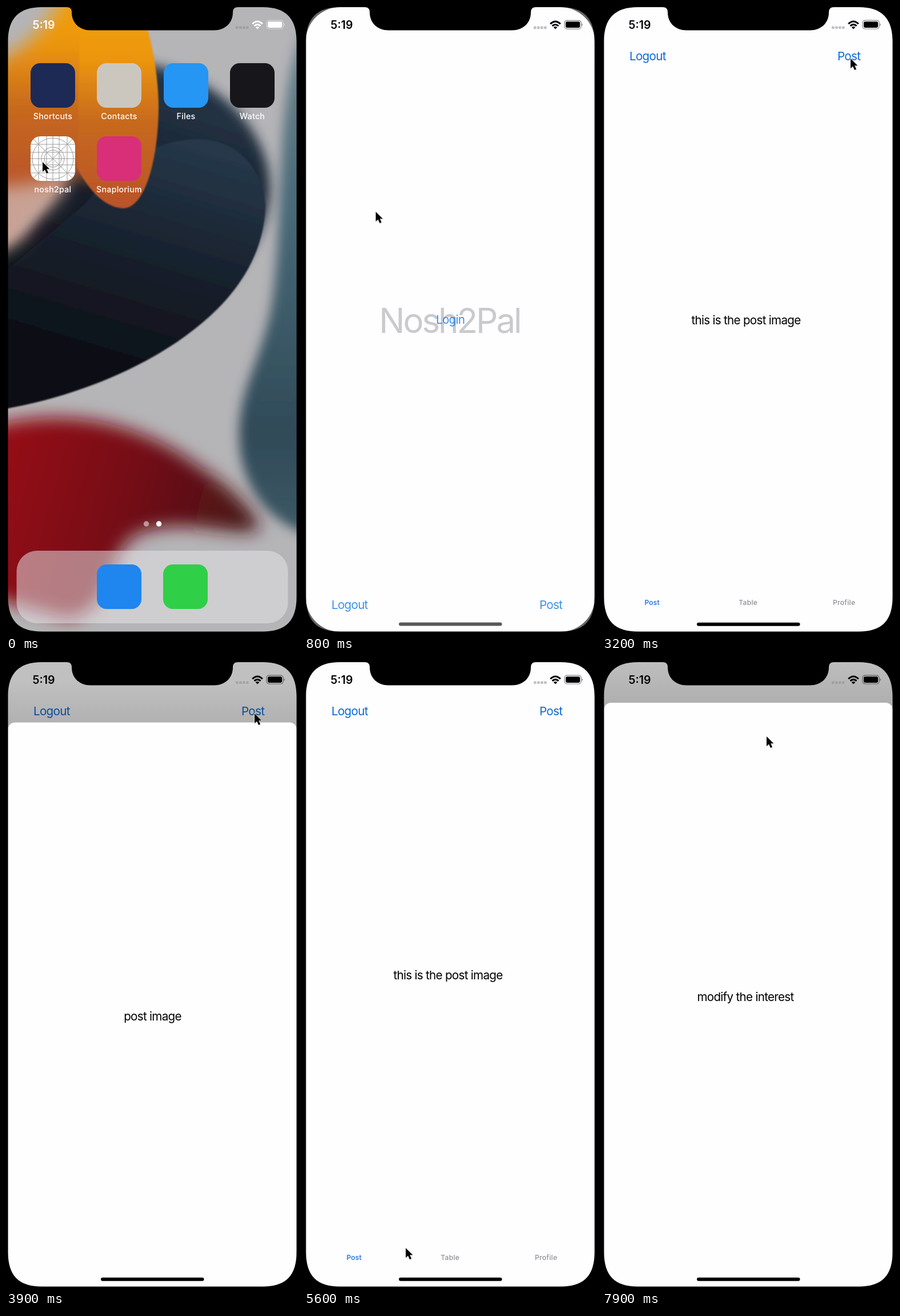
An HTML page for the animation above (8 s loop, 511 by 1097 pixels).

```html
<!DOCTYPE html>
<html lang="en">
<head>
<meta charset="utf-8">
<title>Phone app walkthrough</title>
<style>
  html, body { margin: 0; width: 100%; height: 100%; overflow: hidden; background: #000; }
  svg { display: block; width: 100%; height: 100%; }
  text { font-family: Inter, "Open Sans", sans-serif; }
  .body { font-size: 20.6px; letter-spacing: -.7px; }
  .link { fill: #0a6ad6; }
  .bright { fill: #0878e6; }
  .mid { text-anchor: middle; }
  .label { font-size: 14.2px; font-weight: 500; fill: #fff; letter-spacing: .3px; text-anchor: middle; }
  .tab { font-size: 12px; font-weight: 500; letter-spacing: .3px; text-anchor: middle; }
  .clock { font-size: 19.5px; font-weight: 600; }
</style>
</head>
<body>
<svg viewBox="0 0 511 1097" preserveAspectRatio="none">
  <defs>
    <linearGradient id="orange" x1="0" y1="0" x2="0" y2="1">
      <stop offset="0" stop-color="#f2a20a"/><stop offset=".3" stop-color="#ec960f"/>
      <stop offset=".6" stop-color="#c7691e"/><stop offset="1" stop-color="#b9532a"/>
    </linearGradient>
    <linearGradient id="navy" x1=".7" y1="0" x2=".4" y2="1">
      <stop offset="0" stop-color="#26384a"/><stop offset=".45" stop-color="#17202c"/>
      <stop offset=".8" stop-color="#0f1119"/>
    </linearGradient>
    <linearGradient id="teal" x1="0" y1="0" x2="0" y2="1">
      <stop offset="0" stop-color="#6b838d"/><stop offset=".35" stop-color="#496a78"/>
      <stop offset=".8" stop-color="#304a58"/><stop offset="1" stop-color="#3d5865"/>
    </linearGradient>
    <linearGradient id="red" x1="0" y1=".3" x2="1" y2=".5">
      <stop offset="0" stop-color="#980a14"/><stop offset=".5" stop-color="#760c13"/>
      <stop offset="1" stop-color="#45161a"/>
    </linearGradient>
    <linearGradient id="shade" x1="0" y1="0" x2="0" y2="1">
      <stop offset="0" stop-opacity="0"/><stop offset="1" stop-opacity=".09"/>
    </linearGradient>
    <filter id="soft2" x="-20%" y="-20%" width="140%" height="140%"><feGaussianBlur stdDeviation="1.3"/></filter>
    <filter id="soft10" x="-30%" y="-30%" width="160%" height="160%"><feGaussianBlur stdDeviation="10"/></filter>
    <filter id="soft16" x="-30%" y="-30%" width="160%" height="160%"><feGaussianBlur stdDeviation="15"/></filter>
    <clipPath id="cardClip"><rect id="cardRect"/></clipPath>

    <g id="status">
      <text class="clock" x="46.5" y="40">5:19</text>
      <g fill="#8e8e93" opacity=".55">
        <rect x="402" y="35.5" width="4.6" height="4.6" rx="1"/><rect x="408" y="35.5" width="4.6" height="4.6" rx="1"/>
        <rect x="414" y="35.5" width="4.6" height="4.6" rx="1"/><rect x="420" y="35.5" width="4.6" height="4.6" rx="1"/>
      </g>
      <g fill="none" stroke="currentColor" stroke-width="3">
        <path d="M431.200 31.300Q440 22.700 448.800 31.300M434.500 34.900Q440 29.900 445.500 34.900"/>
      </g>
      <path d="M440 40.500L436.700 37.200Q440 34.600 443.300 37.200Z"/>
      <rect x="456" y="25.200" width="29" height="14.800" rx="4.200" fill="none" stroke="currentColor" stroke-opacity=".5" stroke-width="1.200"/>
      <rect x="458" y="27.200" width="25" height="10.800" rx="2.400"/>
      <path d="M486.500 30.200Q489 32.500 486.500 35Z" opacity=".6"/>
    </g>

    <g id="gridIcon">
      <rect width="78" height="78" rx="17" fill="#fff"/>
      <g fill="none" stroke="#9a9a9a" stroke-width="1">
        <path d="M5 5L73 73M73 5L5 73M39 0V78M0 39H78M14 0V78M64 0V78M0 14H78M0 64H78M28 0V78M50 0V78M0 28H78M0 50H78"/>
        <circle cx="39" cy="39" r="36"/><circle cx="39" cy="39" r="20"/><circle cx="39" cy="39" r="15"/>
      </g>
    </g>
  </defs>

  <g id="home">
    <g id="wallpaper">
      <rect x="-40" y="-40" width="591" height="1177" fill="#b5b4b7"/>
      <path d="M530 30C470 120 487 350 468 500C455 610 408 660 408 750C408 830 450 900 530 925Z" fill="url(#teal)" filter="url(#soft10)"/>
      <path d="M180 100C320 85 462 190 462 320C460 400 400 480 330 540L-40 640V430C60 400 100 300 180 100Z" fill="url(#navy)" filter="url(#soft10)"/>
      <path d="M140 345C250 200 438 190 454 350C452 420 420 480 370 530C280 620 130 685 -20 708V480Z" fill="url(#navy)" filter="url(#soft2)"/>
      <path d="M-40 220L110 280C120 330 60 360 40 390C20 425 0 425 -40 440Z" fill="#c9a294" filter="url(#soft16)"/>
      <path d="M-40 105Q60 75 110 -40H220V280C190 330 150 290 110 295C70 310 20 315 -40 320Z" fill="url(#orange)" filter="url(#soft16)"/>
      <path d="M130 -20H225C258 50 267 130 267 180C266 270 243 354 205 354C170 352 145 320 125 285Z" fill="url(#orange)" filter="url(#soft2)"/>
      <path d="M-40 740C80 700 220 720 330 800C400 845 435 885 445 915C400 935 300 885 220 930C170 980 190 1050 110 1072L-40 1030Z" fill="url(#red)" filter="url(#soft16)"/>
    </g>
    <g id="springboard">
      <circle cx="245.500" cy="906" r="4.700" fill="#fff" opacity=".5"/>
      <circle cx="267.500" cy="906" r="4.700" fill="#fff"/>
      <rect x="18.500" y="953" width="475" height="127" rx="36" fill="#e6e4e8" opacity=".52"/>
      <g id="apps"></g>
    </g>
  </g>
  <rect id="homeDim" width="511" height="1097"/>
  <use id="homeStatus" href="#status" fill="#fff" color="#fff"/>

  <g id="card" clip-path="url(#cardClip)">
    <g id="cardContent">
      <rect width="511" height="1097" fill="#fefdff"/>
      <text id="splash" class="mid" x="255" y="572" font-size="60" letter-spacing="-3">Nosh2Pal</text>
      <g id="login" class="body bright">
        <text x="231" y="556">Login</text><text x="48" y="1055.500">Logout</text><text x="412" y="1055.500">Post</text>
      </g>
      <g id="feed" class="body">
        <text class="link" x="48" y="94.500" id="logout">Logout</text>
        <g id="feedOnly">
          <text class="link" x="412" y="94.500">Post</text>
          <text class="mid" x="252" y="556.500">this is the post image</text>
        </g>
        <g id="tabs"></g>
      </g>
      <g id="modal">
        <rect id="modalDim" width="511" height="1097" opacity=".25"/>
        <g id="sheet">
          <rect y="0" width="511" height="85" fill="url(#shade)"/>
          <rect x="3.500" y="73" width="505" height="1100" rx="12" fill="#fefdff"/>
          <text id="sheetText" class="body mid" y="594.500"></text>
        </g>
      </g>
      <use href="#status" color="#000"/>
      <rect id="indicator" x="166" y="1078.700" width="180.500" height="6" rx="3"/>
    </g>
    <use id="launchIcon" href="#gridIcon"/>
  </g>

  <path fill-rule="evenodd" d="M0 0H511V1097H0ZM63 2H106C112 2 115 5 115 11C115 30 129 42.500 148 42.500H364C383 42.500 397 30 397 11C397 5 400 2 406 2H449C490 2 508.500 22 508.500 62V1034C508.500 1075 490 1094.500 449 1094.500H63C22 1094.500 3.500 1075 3.500 1034V62C3.500 22 22 2 63 2Z"/>
  <g id="cursor">
    <path d="M1 2V18L5 14.500L8 21L11 19.700L8 13.500H13Z" opacity=".2" filter="url(#soft2)"/>
    <path d="M0 0V17L4 13.500L7 20L10 18.600L7.200 12.300H12.300Z" stroke="#fff" stroke-width="1.200" paint-order="stroke"/>
  </g>
</svg>
<script>
const LOOP = 8000, STEP = 100;
const el = id => document.getElementById(id);
const set = (id, attrs) => { for (const k in attrs) el(id).setAttribute(k, attrs[k]); };
const show = (id, on) => set(id, { opacity: +on });
const clamp = v => Math.min(1, Math.max(0, v));
const ramp = (t, from, to) => clamp((t - from) / (to - from));
const mix = (a, b, p) => a + (b - a) * p;

// App tiles: x, y, colour, label
const apps = [
  [43, 100, '#1d2a56', 'Shortcuts'], [159, 100, '#cbc7be', 'Contacts'],
  [276, 100, '#2596f3', 'Files'], [392, 100, '#17161a', 'Watch'],
  [43, 228, null, 'nosh2pal'], [159, 228, '#d82f78', 'Snaplorium'],
  [159, 977, '#1e86ee', ''], [275, 977, '#30cf48', '']
];
el('apps').innerHTML = apps.map(([x, y, color, label]) => (color
  ? `<rect x="${x}" y="${y}" width="78" height="78" rx="17" fill="${color}"/>`
  : `<use href="#gridIcon" x="${x}" y="${y}"/>`)
  + `<text class="label" x="${x + 39}" y="${y + 98}">${label}</text>`).join('');

const tabNames = ['Post', 'Table', 'Profile'];
el('tabs').innerHTML = tabNames.map((name, i) =>
  `<text class="tab" id="tab${i}" x="${87.7 + 168 * i}" y="1048">${name}</text>`).join('');

// Pointer stops: time, x, y
const stops = [
  [0, 64, 273], [500, 64, 273], [900, 137, 376], [1500, 266, 577], [1800, 257, 552],
  [2400, 257, 552], [2900, 445, 104], [3100, 435, 92], [4000, 435, 92], [4600, 323, 175],
  [4700, 323, 175], [5300, 215, 1078], [5400, 205, 1069], [5600, 178, 1027],
  [5900, 250, 1040], [6000, 250, 1040], [6300, 446, 1026], [6500, 440, 1026],
  [7000, 440, 64], [7200, 435, 85], [7400, 435, 85], [7800, 288, 132], [8000, 288, 132]
];
function pointer(t) {
  const i = stops.findIndex(s => s[0] > t);
  const [t0, x0, y0] = stops[i - 1], [t1, x1, y1] = stops[i];
  const u = ramp(t, t0, t1), p = u * u * (3 - 2 * u);
  return [mix(x0, x1, p), mix(y0, y1, p)];
}

function drawLaunch(t) {
  const p = 1 - (1 - ramp(t, 100, 848)) ** 3;
  const left = mix(43, 3, p), width = mix(121, 509, p) - left;
  const top = mix(228, 2, p * p), height = mix(306, 1095, p ** 1.2) - top;
  const scale = width / 506;
  const dim = clamp(p / .785);
  show('card', t > 100);
  set('cardRect', { x: left, y: top, width, height, rx: p < 1 ? mix(17, 60, p) : 0 });
  set('cardContent', { transform: `translate(${left - 3 * scale} ${top - 2 * scale}) scale(${scale})` });
  set('indicator', { transform: `translate(0 ${height / scale - 1093})`, opacity: p < 1 ? p * .65 : 1 });
  set('launchIcon', {
    transform: `translate(${left} ${top}) scale(${width / 78} ${height / 78})`,
    opacity: clamp(1 - p * 2)
  });
  el('home').style.filter = p > 0 && p < 1 ? `blur(${12 * dim}px)` : '';
  set('springboard', { transform: `translate(256 548) scale(${1 - .05 * dim}) translate(-256 -548)` });
  set('homeDim', { opacity: .42 * dim });
  set('homeStatus', { opacity: 1 - .6 * dim });
}

function drawPages(t) {
  const loginIn = ramp(t, 600, 850), loggedIn = t >= 2400;
  const tab = t < 6000 ? 0 : t < 6500 ? 1 : 2;
  set('splash', { opacity: 1 - loginIn });
  set('login', { opacity: loggedIn ? 0 : loginIn });
  show('feed', loggedIn);
  show('feedOnly', tab === 0);
  show('logout', tab !== 1);
  tabNames.forEach((_, i) => set('tab' + i, { fill: i === tab ? '#0a6ad6' : '#8e8e93' }));
}

function drawSheet(t, pointerY) {
  const last = t >= 7300;
  const rise = (1 - ramp(t, last ? 7300 : 3700, last ? 7650 : 4050)) ** 4;
  let offset = 1024 * rise;
  if (!last && t > 4700) offset = t < 5400 ? Math.max(0, pointerY - 175) : 1024;
  show('modal', offset < 1024);
  set('modalDim', { opacity: .25 * (1 - offset / 1024) });
  set('sheet', { transform: `translate(0 ${offset})` });
  set('sheetText', { x: last ? 251 : 256.5 });
  el('sheetText').textContent = last ? 'modify the interest' : 'post image';
}

function frame(now) {
  const t = Math.floor(now % LOOP / STEP) * STEP;
  const [x, y] = pointer(t);
  drawLaunch(t);
  drawPages(t);
  drawSheet(t, y);
  set('cursor', { transform: `translate(${x} ${y})` });
  requestAnimationFrame(() => frame(performance.now() - start));
}
const start = performance.now();
frame(0);
</script>
</body>
</html>
```
